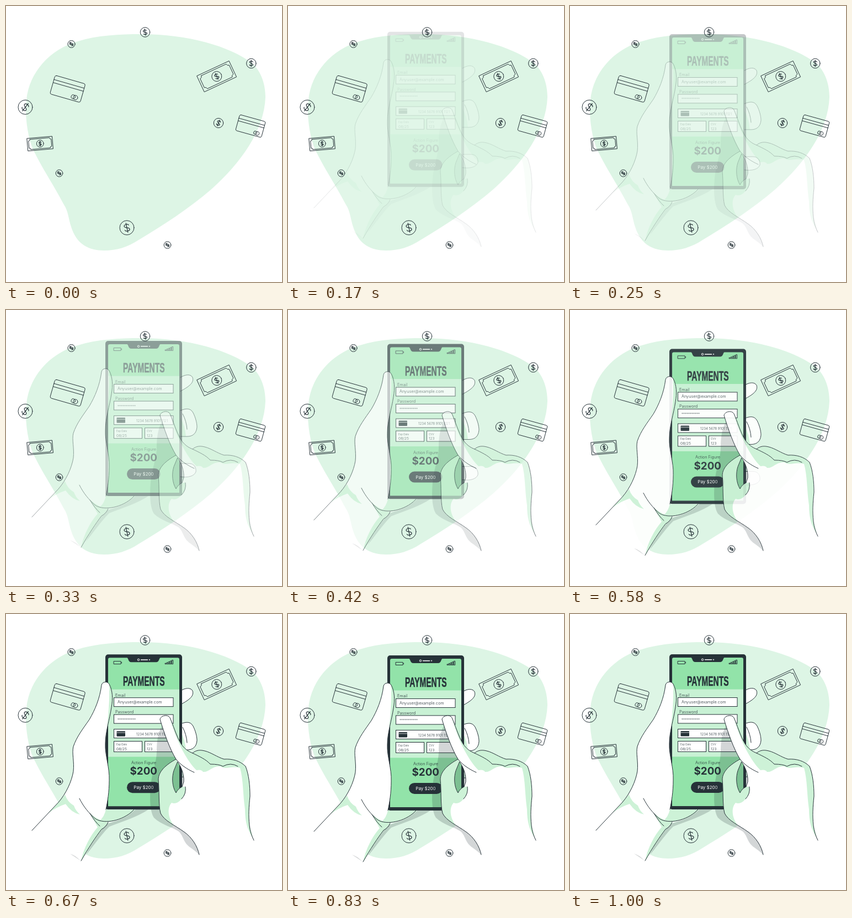
These frames come from a looping animation (500 px wide and 500 px high, 1040 ms). An HTML page:

```html
<!DOCTYPE html>
<html lang="en">
<head>
<meta charset="utf-8">
<title>Mobile payments</title>
<style>
  html, body { margin: 0; width: 100%; height: 100%; overflow: hidden; background: #fff; }
  svg { display: block; width: 100%; height: 100%; }
  text { font-family: Inter, "Open Sans", sans-serif; fill: #263238; }
  defs * { vector-effect: non-scaling-stroke; }
  .line { fill: none; stroke: #263238; stroke-width: 1; stroke-linecap: round; stroke-linejoin: round; }
  .skin { fill: #fff; fill-rule: evenodd; }
  .shade { fill: #cdf2d7; }
  .shadow { fill: #263238; opacity: .2; }
  .box { fill: #fff; stroke: #263238; stroke-width: 1; }
  .ink { fill: #263238; }
</style>
</head>
<body>
<svg viewBox="0 0 500 500">
  <defs>
    <path id="dollar" stroke-width="1.200" d="M4.2 -4C3.5 -7 -4.3 -7 -4.3 -3.2C-4.3 .8 4.4 -.8 4.4 3.4C4.4 7 -4 7 -4.4 3.6M0 -8.6V8.6"/>
    <g id="card">
      <rect x="-28.5" y="-17.5" width="57" height="35" rx="3"/>
      <path d="M-28.5 -9.5H28.5M-28.5 -3.8H28.5"/>
      <circle cx="13.5" cy="11" r="3.6"/>
      <circle cx="18" cy="11.2" r="4"/>
    </g>
    <g id="bill">
      <rect x="-32" y="-16" width="64" height="32"/>
      <path d="M-25 -13H25Q25 -9 29 -9V9Q25 9 25 13H-25Q-25 9 -29 9V-9Q-25 -9 -25 -13Z"/>
      <circle r="9"/>
      <use href="#dollar" transform="scale(.7)"/>
    </g>
  </defs>

  <path fill="#ddf5e5" d="M245 51C330 51 405 73 445 103C464 119 470 145 470 165C468 225 425 285 372 332C330 368 285 397 240 424C220 437 200 443 178 443C150 443 128 432 118 400C113 385 113 372 105 360C85 322 60 285 47 255C38 230 34 195 37 170C42 120 80 78 130 64C165 53 205 51 245 51Z"/>

  <g class="line" id="money">
    <use href="#card" transform="translate(111.7 150.2) rotate(16)"/>
    <use href="#card" transform="translate(443 217.5) rotate(15.5) scale(.85)"/>
    <use href="#bill" transform="translate(381.8 127.5) rotate(-25)"/>
    <use href="#bill" transform="translate(61.8 249.3) rotate(-5) scale(.71)"/>
  </g>

  <!-- fingers behind the phone -->
  <g data-fade data-slide>
    <path class="skin" d="M316 139C324 134 334 132 338 139C341 148 333 155 316 164Z"/>
    <path class="line" d="M316 139C324 134 334 132 338 139C341 148 333 155 316 164"/>
    <path class="skin" d="M316 199C326 195 334 194 339 203C343 211 346 221 346 229C345 240 339 246 328 246H316Z"/>
    <path class="shade" d="M316 212Q324 226 326 246H316Z"/>
    <path class="line" d="M316 199C326 195 334 194 339 203C343 211 346 221 346 229C345 240 339 246 328 246H316M320 205Q327 218 328 233"/>
    <path class="skin" d="M316 295H332C341 295 345 303 344 310C341 318 330 321 316 319Z"/>
    <path class="line" d="M316 295H332C341 295 345 303 344 310C341 318 330 321 316 319"/>
  </g>

  <g data-fade data-slide>
    <rect class="ink" x="180" y="73" width="139" height="281" rx="5"/>
    <path fill="#92e3a9" d="M188 79H219C222 79 221 87 227 87H272C278 87 277 79 280 79H311Q314 79 314 82V348H185V82Q185 79 188 79Z"/>
    <rect x="185" y="136.500" width="129" height="122" fill="#c8f1d4"/>
    <g fill="none" stroke="#fff">
      <circle cx="240" cy="82.700" r="1.700"/>
      <path d="M244.500 82.700H256.500" stroke-width="1.500" stroke-linecap="round"/>
      <circle cx="260" cy="82.700" r=".7"/>
    </g>
    <path class="line" d="M195.500 85.500H208V90.500H195.500ZM209.500 87V89"/>
    <g class="line" id="signal"></g>
    <text transform="translate(249.800 130.300) scale(.585 1)" text-anchor="middle" font-size="24" font-weight="700" stroke="#263238" stroke-width=".5" style="font-family:'Liberation Sans',Arial,sans-serif">PAYMENTS</text>

    <rect class="box" x="195.500" y="151.500" width="107.500" height="16"/>
    <rect class="box" x="195.500" y="182" width="107.500" height="16"/>
    <rect class="box" x="195.500" y="208.500" width="107.500" height="16"/>
    <rect class="box" x="195.500" y="230.500" width="51" height="19"/>
    <rect class="box" x="251.500" y="230.500" width="51.500" height="19"/>
    <g font-size="7.300" font-weight="300">
      <text x="198" y="149.500">Email</text>
      <text x="202" y="161.800">Anyuser@example.com</text>
      <text x="198" y="179.700">Password</text>
      <text x="202" y="193.500" font-size="6">***********</text>
      <text x="236" y="219.800" font-size="6.200">1234 5678 9101 1121</text>
      <text x="200" y="238" font-size="4.600">Exp Date</text>
      <text x="200" y="246.700" font-size="6.800">08/25</text>
      <text x="255" y="238" font-size="4.600">CVV</text>
      <text x="255" y="246.700" font-size="6.500">123</text>
      <text x="249.500" y="272" text-anchor="middle">Action Figure</text>
    </g>
    <rect class="ink" x="200.500" y="212" width="15.500" height="9.500" rx="1"/>
    <path d="M200.500 214.800H216" stroke="#fff" stroke-width=".8"/>
    <text x="249.300" y="291.300" text-anchor="middle" font-size="18.800" font-weight="700">$200</text>
    <rect class="ink" x="219" y="304" width="60.500" height="20" rx="10"/>
    <text x="249.500" y="317" text-anchor="middle" font-size="8" style="fill:#fff">Pay $200</text>
  </g>

  <!-- hand holding the phone -->
  <g data-fade data-slide>
    <path class="shadow" d="M229 354H258C238 367 213 375 187 385C170 402 156 424 144 437L172 383Q210 374 229 354Z"/>
    <path class="shade" d="M180 205C178 218 173 226 172 236L180 242Z"/>
    <path class="line" d="M180 205C178 218 173 226 172 236L180 242"/>
    <path class="skin" d="M173 129C174 122 184 121 187 127C193 138 194 153 191 169C188 190 180 213 180 235C179 255 188 278 187 301C187 322 184 340 181 354H234C222 366 207 374 185 378C168 394 150 426 136 447L118 435L47 392L95 341C109 325 119 303 122 285C124 267 119 252 122 240C128 222 140 207 151 191C161 174 170 153 173 129Z"/>
    <path class="shade" d="M187 127C193 138 194 153 191 169C189 181 186 193 183 206C185 184 188 160 187 127Z"/>
    <path class="shade" d="M181 354H234C222 366 207 374 183 377Q176 377 170 374Q178 367 181 354Z"/>
    <path class="shade" d="M76 361L95 341L107 327Q111 340 123 347Q126 356 134 363Q119 360 108 344Q92 349 76 361Z"/>
    <path class="shade" d="M152 361Q168 374 185 378C168 394 150 426 136 447C141 424 152 402 166 386Z"/>
    <path class="shadow" d="M116 434Q126 437 134 446L128 442Z"/>
    <path class="line" d="M47 392L95 341C109 325 119 303 122 285C124 267 119 252 122 240C128 222 140 207 151 191C161 174 170 153 173 129C174 122 184 121 187 127C193 138 194 153 191 169C188 190 180 213 180 235C179 255 188 278 187 301C187 322 184 340 181 354M133 334C141 350 150 360 161 370C174 380 205 377 227 359L232 354M136 447C149 424 163 403 173 390Q182 385 185 377M152 361Q161 376 170 384"/>
  </g>

  <!-- hand tapping the screen -->
  <g data-fade>
    <path class="shadow" d="M283 202C275 214 273 232 273 250C273 268 264 288 262 312C260 336 261 358 268 369C281 382 302 386 313 394C323 404 320 413 334 423Q344 430 350 436L340 405L301 379L290 350L312 325L324 300L308 263Z"/>
    <path class="skin" d="M279 191C280 184 293 181 297 188C303 201 308 220 317 235C323 244 330 249 338 252C345 246 352 246 360 248C372 251 382 259 395 263C410 262 424 266 434 276C440 291 442 311 442 330C440 350 439 365 441 383C442 393 445 402 449 410L350 436C347 420 336 404 323 395C305 382 287 375 280 361C276 345 278 320 276 300C276 285 290 273 308 263C296 243 287 217 279 191ZM311 268C318 278 323 291 322 304L319 313Q311 317 308 324C301 313 300 296 304 284Z"/>
    <path class="shade" d="M308 263C290 273 276 285 276 300C278 320 276 345 280 361Q287 373 304 383C294 370 291 352 300 342Q309 346 318 335Q327 326 325 313L319 313Q311 317 308 324C301 313 300 296 304 284L311 268Z"/>
    <path class="shade" d="M297 188C303 201 308 220 317 235C323 244 330 249 338 252C345 246 352 246 360 248C372 251 382 259 395 263C410 262 424 266 434 276C440 291 442 311 442 330C440 350 439 365 441 383L447 405C437 391 433 375 433 354C429 326 430 300 424 279C407 274 399 283 388 276C373 275 368 287 357 286Q354 281 345 283C329 267 309 233 297 188Z"/>
    <path class="line" d="M350 436C347 420 336 404 323 395C305 382 287 375 280 361C276 345 278 320 276 300C276 285 290 273 308 263C296 243 287 217 279 191C280 184 293 181 297 188C303 201 308 220 317 235C323 244 330 249 338 252C345 246 352 246 360 248C372 251 382 259 395 263C410 262 424 266 434 276C440 291 442 311 442 330C440 350 439 365 441 383C442 393 445 402 449 410"/>
    <path class="line" d="M308 263C317 274 328 281 341 287M338 252C350 258 362 263 370 272Q386 272 393 276Q407 268 420 276M311 268C318 278 323 291 322 304L319 313Q311 317 308 324C301 313 300 296 304 284ZM325 313Q327 326 318 335"/>
  </g>
</svg>
<script>
const FRAME = 1000 / 24, LOOP = 1040, DROP = 30;

const make = (parent, tag, attrs) => {
  const node = document.createElementNS("http://www.w3.org/2000/svg", tag);
  for (const key in attrs) node.setAttribute(key, attrs[key]);
  return parent.appendChild(node);
};

// x, y, radius, tilt of the dollar sign
const coins = [
  [252, 47.500, 8.700, -12], [118.500, 69, 6.500, -50], [444.300, 104, 8.700, 0], [385, 212, 8.700, 22],
  [35, 183.300, 13, 38], [96.500, 303, 6.300, -50], [219, 401.700, 13, -12], [292.500, 433, 6.300, -50]
];
const money = document.getElementById("money");
for (const [x, y, r, tilt] of coins) {
  make(money, "circle", { cx: x, cy: y, r });
  make(money, "use", { href: "#dollar", transform: `translate(${x} ${y}) rotate(${tilt}) scale(${r / 13})` });
}

const signal = document.getElementById("signal");
for (let i = 0; i < 5; i++) {
  const height = 1.5 + i * 1.4;
  make(signal, "rect", { x: 288.5 + i * 3.1, y: 90.5 - height, width: 1.8, height });
}

const bezier = (a, b, s) => 3 * (1 - s) ** 2 * s * a + 3 * (1 - s) * s * s * b + s ** 3;

// cubic-bezier(.36, -.01, .5, 1.38), solved by bisection
function ease(x) {
  let low = 0, high = 1;
  for (let i = 0; i < 24; i++) {
    const mid = (low + high) / 2;
    if (bezier(.36, .5, mid) < x) low = mid; else high = mid;
  }
  return bezier(-.01, 1.38, low);
}

const fading = document.querySelectorAll("[data-fade]");
const sliding = document.querySelectorAll("[data-slide]");

function render(time) {
  const step = Math.floor((time % LOOP + 5) / FRAME);
  const progress = step < 2 ? 0 : ease(Math.min(1, (step + .5) * FRAME / 1000));
  for (const node of fading) node.setAttribute("opacity", Math.max(0, Math.min(1, progress)));
  for (const node of sliding) node.setAttribute("transform", `translate(0 ${DROP * (progress - 1)})`);
}

let start;
function tick(now) {
  start ??= now;
  render(now - start);
  requestAnimationFrame(tick);
}
render(0);
requestAnimationFrame(tick);
</script>
</body>
</html>
```
